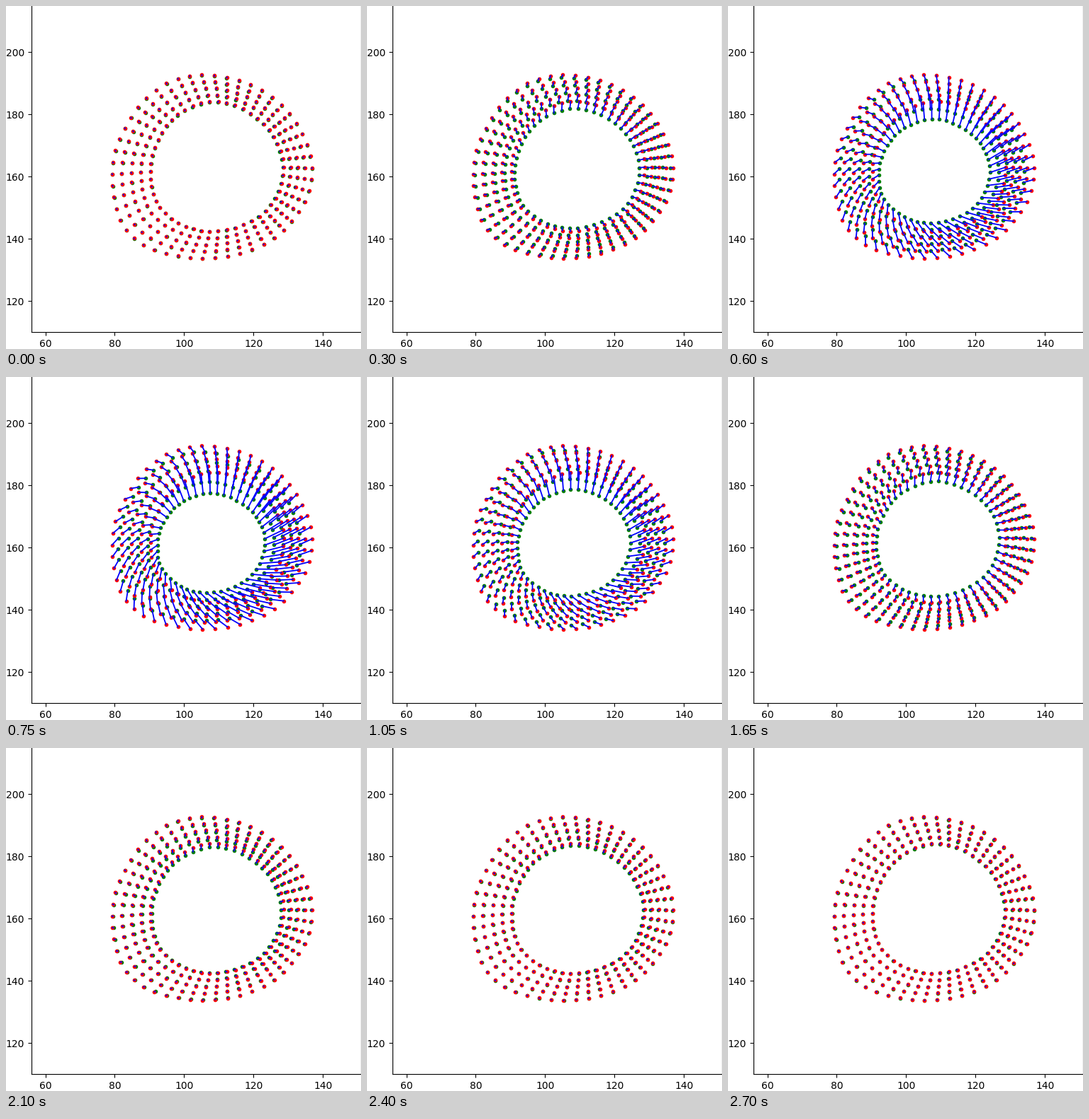
Write a matplotlib script that moves like this. It is 501 by 485 pixels and loops after 2850 ms.

```python
import numpy as np
import matplotlib.pyplot as plt
from matplotlib.animation import FuncAnimation

WIDTH, HEIGHT, DPI = 501, 485, 100
FRAMES, INTERVAL = 19, 150
SPOKES, RINGS = 50, 5
LEFT, BASE, AX_W, AX_H = 36, 461, 465, 462
X_LIM, Y_LIM = (56, 151), (110, 215)

# Resting outlines: every second spoke, in stage pixels.
OUTER = [(276, 97), (311, 100), (345, 111), (375, 128), (400, 152),
         (418, 180), (429, 212), (431, 245), (421, 276), (403, 304),
         (378, 327), (347, 344), (312, 353), (277, 356), (242, 353),
         (209, 344), (180, 328), (161, 302), (152, 270), (149, 237),
         (154, 204), (167, 172), (186, 143), (211, 118), (242, 102)]
INNER = [(287, 134.5), (311, 136), (334, 145), (355, 158), (371, 175),
         (383, 194), (390, 216), (391, 239), (385, 261), (374, 281),
         (357, 297), (335, 309), (311, 316), (287, 318), (264, 315),
         (243, 306), (224, 293), (211, 275), (205, 255), (203, 233),
         (206, 211), (214, 189), (226, 169), (242, 153), (263, 141)]

# Displacement harmonics per key time:
# x mean, x cos, x sin, y mean, y cos, y sin, y cos of the double angle.
KEY_TIMES = np.array([0, 2, 5, 7, 11, 14, 18])
INNER_MOTION = np.array([
    (-0.5, 0.1, -0.8, 0.5, 0.6, 0.0, 0.2),
    (-1.7, 0.4, -6.0, 1.95, 7.4, 0.2, 1.0),
    (-7.9, 8.55, -18.1, 5.35, 21.3, 8.2, 2.6),
    (-5.6, 5.6, -14.1, 5.45, 16.3, 4.4, 2.2),
    (-1.9, 0.1, -7.3, 0.85, 10.5, -0.3, 1.2),
    (-0.8, 0.4, -2.8, 1.65, 3.0, 0.2, 0.8),
    (-0.5, 0.1, -0.8, 0.5, 0.6, 0.0, 0.2)])
OUTER_MOTION = np.array([
    (0.0, 0.0, -0.4, 0.6, 0.3, 0.0, 0),
    (-0.5, -1.5, -3.5, 0.3, 3.5, -0.5, 0),
    (-3.8, 8.3, -12.5, -1.2, 10.2, 9.4, 0),
    (-2.4, 4.9, -9.0, 0.5, 5.7, 6.0, 0),
    (-0.3, -1.5, -4.2, 0.0, 4.5, -1.0, 0),
    (0.0, -0.5, -1.3, 0.5, 0.8, 0.0, 0),
    (0.0, 0.0, -0.4, 0.6, 0.3, 0.0, 0)])

angle = 2 * np.pi * np.arange(SPOKES) / SPOKES
depth = np.linspace(0, 1, RINGS)[:, None]


def closed_curve(points):
    """Smooth periodic curve through the points, as complex x + iy."""
    z = np.array([complex(*p) for p in points])
    count = len(z)
    freq = np.fft.fftfreq(count, 1 / count)
    coef = np.where(abs(freq) <= 9, np.fft.fft(z) / count, 0)
    return np.exp(1j * np.outer(angle, freq)) @ coef


def at_time(keys, t):
    """Cubic Hermite interpolation between key times."""
    slope = np.gradient(keys, KEY_TIMES, axis=0)
    i = min(np.searchsorted(KEY_TIMES, t, side="right") - 1, len(keys) - 2)
    span = KEY_TIMES[i + 1] - KEY_TIMES[i]
    u = (t - KEY_TIMES[i]) / span
    return ((1 + 2 * u) * (1 - u) ** 2 * keys[i]
            + u * (1 - u) ** 2 * span * slope[i]
            + u * u * (3 - 2 * u) * keys[i + 1]
            + u * u * (u - 1) * span * slope[i + 1])


def displacement(keys, t):
    x0, xc, xs, y0, yc, ys, y2 = at_time(keys, t)
    c, s = np.cos(angle), np.sin(angle)
    return (x0 + xc * c + xs * s
            + 1j * (y0 + yc * c + ys * s + y2 * np.cos(2 * angle)))


def to_data(z):
    x = X_LIM[0] + (z.real + 0.5 - LEFT) * (X_LIM[1] - X_LIM[0]) / AX_W
    y = Y_LIM[0] + (BASE - z.imag - 0.5) * (Y_LIM[1] - Y_LIM[0]) / AX_H
    return x.ravel(), y.ravel()


rest = (1 - depth) * closed_curve(OUTER) + depth * closed_curve(INNER)
rest_x, rest_y = to_data(rest)

# The small margin keeps the pixel size from being rounded down.
fig = plt.figure(figsize=((WIDTH + 0.01) / DPI, (HEIGHT + 0.01) / DPI),
                 dpi=DPI, facecolor="white")
ax = fig.add_axes([LEFT / WIDTH, (HEIGHT - BASE) / HEIGHT,
                   AX_W / WIDTH, AX_H / HEIGHT])
ax.set(xlim=X_LIM, ylim=Y_LIM,
       xticks=range(60, 141, 20), yticks=range(120, 201, 20))

dots = dict(linestyle="none", marker=".", markersize=6)
moving, = ax.plot([], [], color="green", zorder=2, **dots)
ax.plot(rest_x, rest_y, color="red", zorder=3, **dots)
links, = ax.plot([], [], color="blue", linewidth=1.3, zorder=4,
                 solid_capstyle="projecting")


def with_gaps(start, end):
    return np.column_stack([start, end, np.full(len(start), np.nan)]).ravel()


def update(frame):
    weight = depth ** 1.3
    shift = ((1 - weight) * displacement(OUTER_MOTION, frame)
             + weight * displacement(INNER_MOTION, frame))
    x, y = to_data(rest + shift)
    moving.set_data(x, y)
    links.set_data(with_gaps(rest_x, x), with_gaps(rest_y, y))
    return moving, links


animation = FuncAnimation(fig, update, frames=FRAMES, interval=INTERVAL,
                          repeat=True, repeat_delay=0)
plt.show()
```
